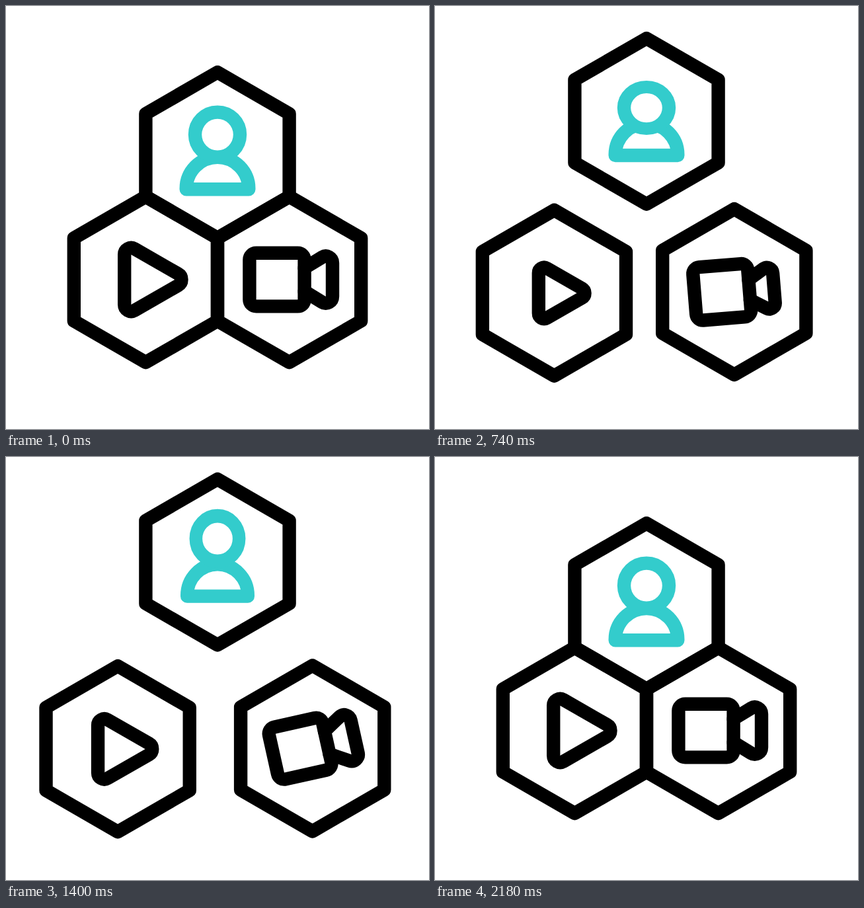
These frames come from a looping animation (640 px wide and 640 px high, 2400 ms). An HTML page:

```html
<!DOCTYPE html>
<html lang="en">
<head>
<meta charset="utf-8">
<title>Media hexagons</title>
<style>
  html, body { margin: 0; width: 100%; height: 100%; overflow: hidden; background: #fff; }
  svg { display: block; width: 100%; height: 100%; }
  path, rect, circle { fill: none; stroke: #000; stroke-width: 20.4; stroke-linejoin: round; stroke-linecap: round; }
  .teal { stroke: #33cccc; }
  .fixed { vector-effect: non-scaling-stroke; }
</style>
</head>
<body>
<svg viewBox="0 0 640 640">
  <defs>
    <path id="hex" d="M0-125.4 108.6-62.7V62.7L0 125.4-108.6 62.7V-62.7Z"/>
  </defs>
  <g id="top">
    <use href="#hex" x="320" y="225.7"/>
    <path id="body" class="teal" d="M272.7 277.3V276.2A47.3 47.3 0 0 1 367.3 276.2V277.3Z"/>
    <circle id="head" class="teal" cx="320" cy="194.6" r="34" style="fill:#fff"/>
  </g>
  <g id="left">
    <use href="#hex" x="211.4" y="413.8"/>
    <path id="play" class="fixed" d="M179.2 451.7V376.3A10.2 10.2 0 0 1 194.5 367.4L260.3 405.1A10.2 10.2 0 0 1 260.3 422.9L194.5 460.6A10.2 10.2 0 0 1 179.2 451.7Z"/>
  </g>
  <g id="right">
    <use href="#hex" x="428.6" y="413.8"/>
    <g id="camera">
      <rect x="368.4" y="373.8" width="83.2" height="80.6" rx="10.2"/>
      <path id="lens" class="fixed" d="M451.6 396.4 478.5 380A10.2 10.2 0 0 1 494 388.7V439.5A10.2 10.2 0 0 1 478.5 448.2L451.6 431.8"/>
    </g>
  </g>
</svg>
<script>
const LOOP = 2400, OUT = 1680, BACK = 380;
const el = id => document.getElementById(id);
const clamp = x => Math.min(1, Math.max(0, x));

function bezier(x1, y1, x2, y2) {
  const at = (a, b, s) => 3 * a * s * (1 - s) ** 2 + 3 * b * s * s * (1 - s) + s ** 3;
  return x => {
    if (x <= 0 || x >= 1) return clamp(x);
    let lo = 0, hi = 1;
    for (let i = 0; i < 24; i++) {
      const mid = (lo + hi) / 2;
      if (at(x1, x2, mid) < x) lo = mid; else hi = mid;
    }
    return at(y1, y2, lo);
  };
}
const easeOut = bezier(0.25, 0.1, 0.19, 0.97);
const easeBack = bezier(0.75, 0, 0.75, 0.9);

// 0 when the hexagons touch, 1 when fully apart
const spread = t => t < OUT ? easeOut(t / OUT) : 1 - easeBack((t - OUT) / BACK);

// Smooth interpolation through [time, value] keys
function track(t, ...keys) {
  if (t <= keys[0][0]) return keys[0][1];
  for (let i = 1; i < keys.length; i++) {
    const [t0, v0] = keys[i - 1], [t1, v1] = keys[i];
    if (t < t1) {
      const u = (t - t0) / (t1 - t0);
      return v0 + (v1 - v0) * u * u * (3 - 2 * u);
    }
  }
  return keys[keys.length - 1][1];
}

const move = (id, value) => el(id).setAttribute("transform", value);
const shift = (id, k, dx, dy) => move(id, `translate(${k * dx} ${k * dy})`);
const scaleAt = (id, cx, cy, sx, sy, dy = 0) =>
  move(id, `translate(${cx} ${cy + dy}) scale(${sx} ${sy}) translate(${-cx} ${-cy})`);

function draw(t) {
  shift("top", spread(t), 0, -68);
  shift("left", spread(t - 60), -43.5, 28.7);
  shift("right", spread(t - 120), 36.5, 28.2);

  const bob = track(t, [460, 0], [840, 13], [1400, -4.5], [1760, 0]);
  const headX = track(t, [840, 1], [1400, 0.96], [1760, 1]);
  const headY = track(t, [460, 1], [840, 0.913], [1140, 1], [1400, 1.01], [1760, 1]);
  scaleAt("head", 320, 194.6, headX, headY, bob);
  scaleAt("body", 320, 277, track(t, [840, 1], [1400, 0.974], [1760, 1]), 1);

  const beat = track(t, [460, 1], [780, 0.8], [1100, 1.19], [1420, 0.95], [1740, 1]);
  scaleAt("play", 224, 414, beat, beat);

  const tilt = track(t, [0, 0], [250, 1.8], [1340, -13.3], [1760, 0]);
  move("camera", `rotate(${tilt} 410 414)`);
  const zoom = track(t, [460, 1], [920, 0.82], [1400, 1]);
  scaleAt("lens", 451.6, 414, zoom, zoom);
}

const start = performance.now();
function tick() {
  draw((performance.now() - start) % LOOP);
  requestAnimationFrame(tick);
}
draw(0);
tick();
</script>
</body>
</html>
```
